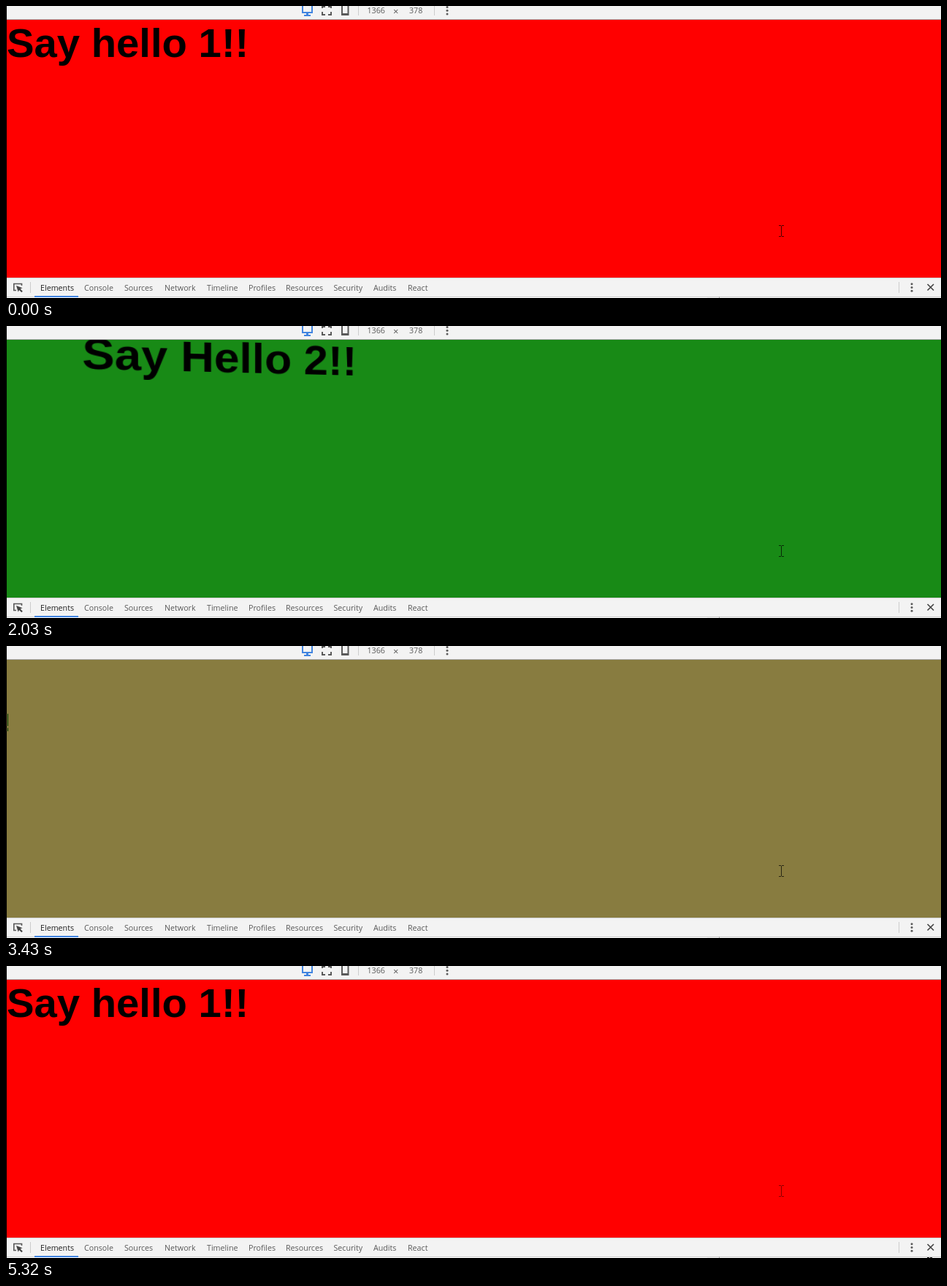
Write an HTML page that moves like this. It is 1280x401 px and loops after 5810 ms.

```html
<!DOCTYPE html>
<html lang="en">
<head>
<meta charset="utf-8">
<title>Page transition</title>
<style>
  html, body { margin: 0; width: 100%; height: 100%; overflow: hidden; background: #f3f3f3; }
  #view { position: absolute; left: 0; top: 19px; width: 1280px; height: 354px; overflow: hidden; background: #fff; }
  .page { position: absolute; inset: 0; overflow: hidden; perspective: 750px; perspective-origin: 640px 177px; }
  .page div {
    position: absolute; inset: 0; transform-origin: 640px 177px; white-space: nowrap; text-indent: 1px;
    font: bold 56.25px/64.6px "Liberation Sans", Arial, sans-serif; color: #000;
  }
  svg { position: absolute; left: 0; top: 0; }
  svg text { font: 10.7px "Open Sans", "Noto Sans", sans-serif; fill: #5a5a5a; }
  svg .times { font-size: 13px; }
</style>
</head>
<body>
<div id="view">
  <div class="page" id="one"><div>Say hello 1!!</div></div>
  <div class="page" id="two"><div>Say Hello 2!!</div></div>
</div>
<svg width="1280" height="401" viewBox="0 0 1280 401">
  <defs>
    <path id="beam" d="M-3.500 -7.500H-.5M.5 -7.500H3.500M0 -7V7M-3.500 7.500H-.5M.5 7.500H3.500" stroke="#000" fill="none"/>
    <g id="dots" fill="#5a5a5a">
      <circle cy="-4.700" r="1.500"/><circle r="1.500"/><circle cy="4.700" r="1.500"/>
    </g>
  </defs>

  <!-- device toolbar -->
  <path d="M0 18.500H1280" stroke="#a9a9a9"/>
  <g fill="none" stroke="#4285e0" stroke-width="2">
    <path d="M406 -1V9H419V-1M408 13H417"/>
    <path d="M412.500 9V13" stroke-width="3"/>
  </g>
  <path d="M433 3V1H437M441 1H445V3M433 8V12H437M441 12H445V8" fill="none" stroke="#5a5a5a" stroke-width="2"/>
  <path d="M460 -1V12H468.500V-1M460 11H468" fill="none" stroke="#5a5a5a" stroke-width="2"/>
  <path d="M482.500 0V13M586.500 0V13" stroke="#ccc"/>
  <text x="494.500" y="10">1366</text>
  <text x="530" y="11.500" class="times">×</text>
  <text x="552" y="10">378</text>
  <use href="#dots" x="604" y="6.300"/>

  <!-- tab bar -->
  <path d="M0 373.500H1280" stroke="#d0d0d0"/>
  <rect y="399" width="1280" height="2" fill="#fff"/>
  <rect x="960" y="400" width="320" height="1" fill="#f3f3f3"/>
  <path d="M0 399.500H1280" stroke="#ccc"/>
  <path d="M976.500 399V401" stroke="#aaa"/>
  <rect x="39" y="398" width="60" height="2" fill="#3f83e0"/>
  <path d="M14 390.500H10.800V381.500H21.500V384" fill="none" stroke="#5a5a5a" stroke-width="1.600"/>
  <path d="M14 384L22.500 387.300L19.600 388.600L22.800 391.800L21.300 393.300L18 390L16.700 392.800Z" fill="#444"/>
  <path d="M33.500 379V394M1222.500 379V394" stroke="#ccc"/>
  <g id="tabs"></g>
  <use href="#dots" x="1240" y="386.500"/>
  <path d="M1261.500 382L1270 390.500M1270 382L1261.500 390.500" stroke="#444" stroke-width="1.600"/>
  <path d="M.5 0V401" stroke="#000"/>

  <use href="#beam" id="trace" x="1061.500" y="309"/>
  <use href="#beam" id="cursor"/>
</svg>
<script>
const LOOP = 5810, STEP = 70;
const byId = id => document.getElementById(id);
const one = byId('one'), two = byId('two');

const tabs = { Elements: 47, Console: 107, Sources: 162, Network: 217, Timeline: 275,
  Profiles: 332, Resources: 383, Security: 448.5, Audits: 503, React: 550 };
for (const [name, x] of Object.entries(tabs)) {
  const label = document.createElementNS('http://www.w3.org/2000/svg', 'text');
  label.setAttribute('x', x);
  label.setAttribute('y', 390.5);
  label.textContent = name;
  if (name === 'Elements') label.style.fill = '#222';
  byId('tabs').append(label);
}

// Eased progress per 70 ms step of each page change
const forth = { start: 1680, steps: [.09, .3, .526, .7, .818, .904, .955, .985, .9975] };
const back = { start: 3290, steps: [.031, .26, .533, .7, .815, .894, .943, .975, .9965] };

function progress(move, t) {
  const i = Math.round((t - move.start) / STEP);
  return i < 0 ? 0 : move.steps[i] ?? 1;
}

// Turns a page's text away: side -1 goes left, +1 goes right; out is 0 at rest.
// Only the background fades, the text stays opaque.
function pose(page, side, out, rgb, alpha, depth) {
  const x = side * (1410 * out + 560 * out * out);
  page.style.visibility = alpha ? 'visible' : 'hidden';
  page.style.background = `rgba(${rgb}, ${alpha})`;
  page.firstElementChild.style.transform = out < .001 ? 'none' :
    `translate3d(${x}px, 0, ${-depth * out}px) rotateY(${side * 90 * out}deg)`;
}

function moveCursor(t) {
  const leave = 4760, settle = 5180;
  let x = 1061.5, y = 309;
  if (t >= leave) {
    const k = Math.min(1, (t - leave + STEP) / 350);
    x += 208 * k;
    y += 93 * k;
  }
  if (t >= settle) {
    const k = Math.min(1, (t - settle + STEP) / 210);
    x -= 5 * k;
    y += 6 * k;
  }
  const cursor = byId('cursor');
  cursor.setAttribute('x', x);
  cursor.setAttribute('y', y);
  cursor.setAttribute('opacity', t >= settle ? 1 : .7);
  byId('trace').setAttribute('opacity', t >= leave ? .45 : 0);
}

function draw(ms) {
  const t = Math.floor(ms % LOOP / STEP) * STEP;
  const returning = t >= back.start;
  const p = returning ? 1 - progress(back, t) : progress(forth, t);
  pose(one, -1, returning ? p : p ** 1.3, '255, 0, 0', 1 - p, 500);
  pose(two, 1, 1 - p, '0, 128, 0', p, 350);
  moveCursor(t);
}

const begin = performance.now();
function tick() {
  draw(performance.now() - begin);
  requestAnimationFrame(tick);
}
tick();
</script>
</body>
</html>
```
